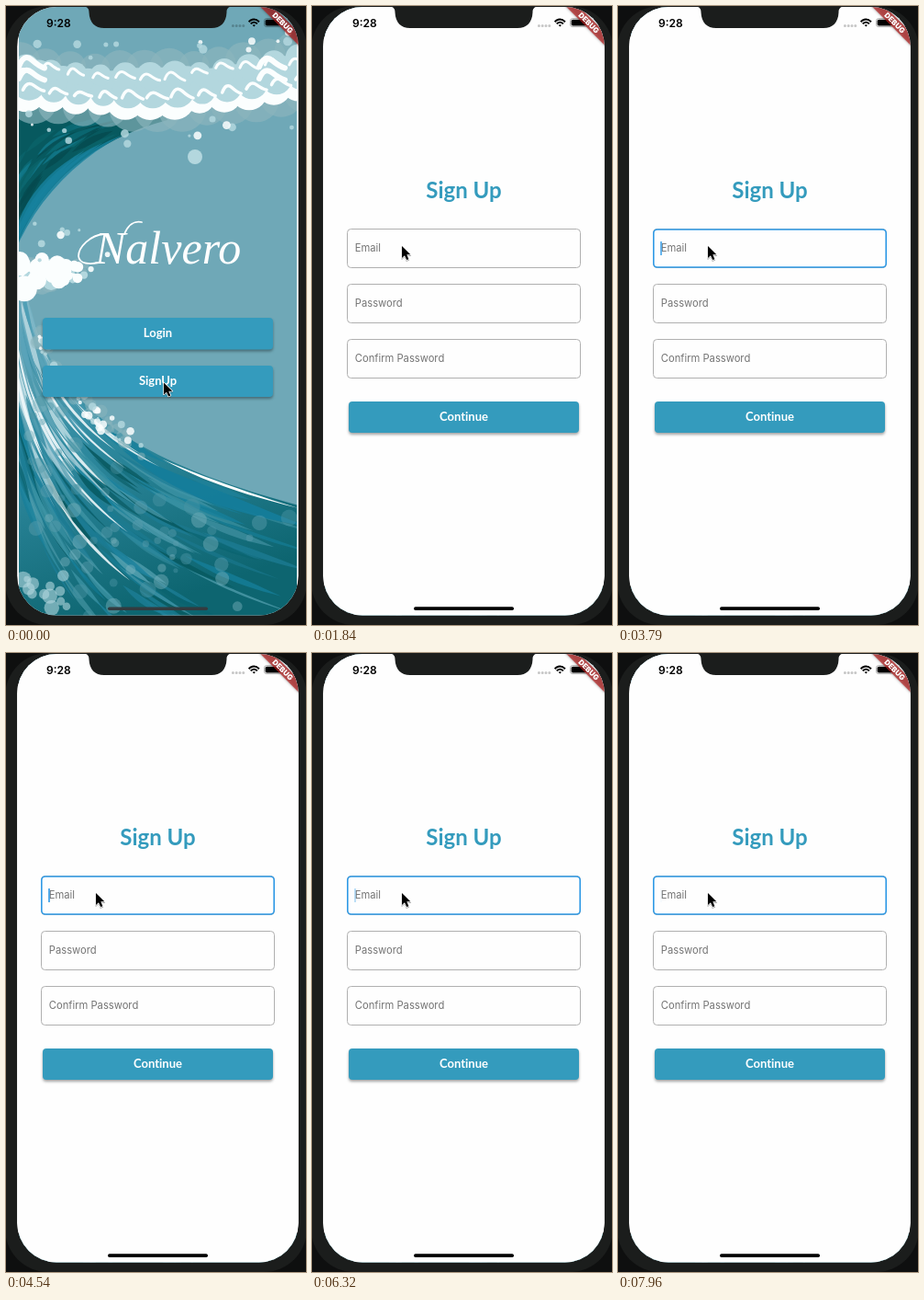
Recreate the animation shown at these times as an HTML page. Size 327 px wide and 673 px high, loop 8000 ms.

```html
<!DOCTYPE html>
<html lang="en">
<head>
<meta charset="utf-8">
<title>Sign up</title>
<style>
  html, body { margin: 0; width: 100%; height: 100%; overflow: hidden; background: #0e0f0f; }
  svg { display: block; width: 327px; height: 673px; }
  .lato { font: 700 13px Lato, sans-serif; fill: #fff; text-anchor: middle; font-variant-ligatures: none; }
  .head { font-size: 24px; fill: #349bbd; }
  .hint { font: 11.2px Inter, sans-serif; fill: #737373; }
  .clock { font: 600 12px Inter, sans-serif; }
  .brand { font: italic 50px "Liberation Serif", serif; fill: #fff; }
  .debug { font: 900 8px Inter, sans-serif; fill: #fff; text-anchor: middle; }
  .btn { fill: #349bbd; filter: drop-shadow(.5px 2px 1.5px rgba(0,0,0,.36)); }
  .box { fill: none; stroke: #b0b0b0; }
  .band { fill: #b71c1c; fill-opacity: .68; }
  #wave { filter: blur(.5px); }
</style>
</head>
<body>
<svg viewBox="0 0 327 673">
  <defs>
    <clipPath id="screen"><rect x="12.2" y="1" width="306.5" height="661.5" rx="43"/></clipPath>
    <clipPath id="art"><rect x="14.5" y="1" width="302" height="661.5"/></clipPath>
    <linearGradient id="sea" x1="0" y1="0" x2=".3" y2="1">
      <stop offset="0" stop-color="#7bb2c2"/>
      <stop offset=".5" stop-color="#2f8aa0"/>
      <stop offset="1" stop-color="#0d6570"/>
    </linearGradient>
  </defs>

  <rect x="-1" width="329" height="673" rx="47" fill="#1b1d1c"/>
  <g clip-path="url(#screen)">
    <rect width="327" height="673" fill="#fefefe"/>

    <g id="home">
      <g clip-path="url(#art)"><g id="wave"></g></g>
      <text class="brand" x="97" y="280">Nalvero</text>
      <path d="M107 248C92 249 79 262 79 272C80 281 92 281 101 279M129 248C133 238 140 233 148 235" fill="none" stroke="#fff" stroke-width="1.8" stroke-linecap="round"/>
      <rect class="btn" x="40" y="339" width="251" height="34.500" rx="4"/>
      <text class="lato" x="165.5" y="360">Login</text>
      <rect class="btn" x="40" y="391" width="251" height="34" rx="4"/>
      <text class="lato" x="165.5" y="412">SignUp</text>
      <rect x="111" y="653.5" width="109" height="3.5" rx="1.7" fill="#343b3f"/>
    </g>

    <g id="form" opacity="0">
      <rect width="327" height="673" fill="#fefefe"/>
      <text class="lato head" x="165.5" y="208.5">Sign Up</text>
      <g id="fields"></g>
      <rect id="focus" x="38.8" y="243" width="253.4" height="41" rx="4" fill="none" stroke="#2f9ae6" stroke-width="1.6"/>
      <rect id="caret" x="46.2" y="256" width="1.6" height="15" fill="#2f9ae6"/>
      <rect class="btn" x="40" y="430" width="251" height="34" rx="4"/>
      <text class="lato" x="165.5" y="451">Continue</text>
      <rect x="111" y="653.3" width="109" height="3.7" rx="1.8"/>
    </g>

    <text class="clock" x="44" y="22.7">9:28</text>
    <path d="M247.400 21.500H259" stroke="#000" stroke-opacity=".22" stroke-width="3" stroke-linecap="round" stroke-dasharray="0 3.8"/>
    <g fill="none" stroke="#000" stroke-width="1.9">
      <path d="M264.6 17.2Q270.3 11.6 276 17.2M266.7 19.4Q270.3 15.8 273.9 19.4"/>
      <path d="M270.3 22.6L268.6 20.8Q270.3 19.5 272 20.8Z" fill="#000" stroke="none"/>
    </g>
    <rect x="281.5" y="13.6" width="18.6" height="9" rx="2.6" fill="none" stroke="#000" stroke-opacity=".4" stroke-width=".8"/>
    <rect x="282.6" y="14.7" width="16.4" height="6.8" rx="1.7"/>
    <g transform="translate(301.7 18.3) rotate(45)">
      <rect x="-40" y="-5" width="80" height="10" style="filter:blur(1.8px)" fill-opacity=".4"/>
      <rect class="band" x="-40" y="-5" width="80" height="10"/>
      <text class="debug" y="2.9">DEBUG</text>
    </g>
  </g>
  <path d="M84 0C89 1 90.500 3 90.500 7C91 18 97 24 107 24H224C234 24 240 18 240.500 7C240.500 3 242 1 247 0Z" fill="#1b1d1c"/>

  <g id="pointer">
    <path transform="scale(.9)" d="M0 0V14.400L3.300 11.300L5.700 16.800L8.200 15.700L5.900 10.400H10.400Z" stroke="#fff" stroke-width="1.6" stroke-linejoin="round" paint-order="stroke" style="filter:drop-shadow(0 1px .8px rgba(0,0,0,.35))"/>
  </g>
</svg>

<script>
const $ = id => document.getElementById(id);

function add(parent, tag, attrs, text = '') {
  const el = document.createElementNS('http://www.w3.org/2000/svg', tag);
  for (const k in attrs) el.setAttribute(k, attrs[k]);
  el.textContent = text;
  return parent.appendChild(el);
}

// ---- Form fields
['Email', 'Password', 'Confirm Password'].forEach((label, i) => {
  const y = 242.5 + 60 * i;
  add($('fields'), 'rect', { class: 'box', x: 38.5, y, width: 254, height: 42, rx: 4 });
  add($('fields'), 'text', { class: 'hint', x: 46.8, y: y + 24.5 }, label);
});

// ---- Wave painting
const wave = $('wave');
const WHITE = '#fbfefe', PALE = '#b3d7de', HAZE = '#8cb5be';
let seed = 28;
const rnd = (a = 0, b = 1) => {
  seed = (seed * 16807) % 2147483647;
  return a + (b - a) * seed / 2147483647;
};
const pick = list => list[Math.floor(rnd(0, list.length))];
const mix = (a, b, s) => a + (b - a) * s;

const dot = (cx, cy, r, fill, opacity = 1) => add(wave, 'circle', { cx, cy, r, fill, opacity });
const shape = (d, fill) => add(wave, 'path', { d, fill });
const repeat = (n, draw) => { for (let i = 0; i < n; i++) draw(i); };

// A short curl of white foam.
function curl(x, y, r, width) {
  const h = r * rnd(.6, 1.1);
  add(wave, 'path', {
    d: `M${x - r} ${y}q${r * .4} ${-h} ${r} ${-h * .5}t${r} ${h * .6}`,
    fill: 'none', stroke: WHITE, 'stroke-width': width, 'stroke-linecap': 'round' });
}

// A point between two cubic guides: s across, t along.
function between(a, b, s, t) {
  const u = 1 - t, w = [u * u * u, 3 * u * u * t, 3 * u * t * t, t * t * t];
  return [0, 1].map(k => w.reduce((sum, v, i) => sum + v * mix(a[i][k], b[i][k], s), 0));
}

// A brush stroke that tapers at both ends.
function streak([a, b], s, t0, t1, fill, width, opacity = 1) {
  const left = [], right = [];
  repeat(13, i => {
    const t = mix(t0, t1, i / 12);
    const [x, y] = between(a, b, s, t), [nx, ny] = between(a, b, s, t + .01);
    const w = width / 2 * Math.sin(Math.PI * i / 12) / (Math.hypot(nx - x, ny - y) || 1);
    const dx = (ny - y) * w, dy = (nx - x) * w;
    left.push(`${x + dx} ${y - dy}`);
    right.unshift(`${x - dx} ${y + dy}`);
  });
  add(wave, 'path', { d: 'M' + left.concat(right).join('L') + 'Z', fill, opacity });
}

add(wave, 'rect', { width: 327, height: 673, fill: '#6fa8b7' });

// Curling lip
const lip = [[[8, 165], [28, 126], [70, 112], [145, 116]], [[10, 266], [34, 198], [92, 146], [176, 124]]];
shape('M10 105H165L176 124C92 146 34 198 10 266Z', '#07595f');
repeat(26, () => {
  const t = rnd(-.05, .65);
  streak(lip, rnd(.05, .9), t, t + rnd(.2, .4), pick(['#0c6c77', '#127a8d', '#054a4f', '#0a636a']), rnd(3, 8), .8);
});
repeat(3, i => streak(lip, .97 - i * .06, -.1, .8 - i * .1, '#17829f', 8, .8));

// Crest foam: haze, white lobes, pale bodies, curls
const crestY = x => 103 - ((x - 140) / 40) ** 2;
const lobes = Array.from({ length: 12 }, (_, i) => ({ x: 22 + 27 * i, r: rnd(16, 22) }));
lobes.forEach(({ x, r }) => dot(x + 8, crestY(x) + 8, r + 5, HAZE, .65));
lobes.forEach(({ x, r }) => dot(x - 6, crestY(x) - 34, r, HAZE, .65));
lobes.forEach(({ x, r }) => dot(x, crestY(x), r, WHITE));
lobes.forEach(({ x, r }) => {
  dot(x + 3, crestY(x) - r * .45, r * .85, PALE);
  dot(x + 13, crestY(x) - 18, r * .85, PALE);
  dot(x, crestY(x) - 27, r * .7, PALE);
});
lobes.forEach(({ x, r }) => {
  curl(x + 8, crestY(x) - 3, r * .55, 3.5);
  curl(x, crestY(x) - rnd(18, 30), r * .5, 3);
});
repeat(4, i => curl(28 + i % 2 * 262, 66 + 13 * (i >> 1), 14, 6));
repeat(26, i => {
  const x = rnd(20, 315);
  dot(x, crestY(x) + (i % 2 ? rnd(22, 48) : rnd(-62, -44)), rnd(1.5, 5), pick([WHITE, PALE, PALE]), .85);
});
dot(206, 164, 8, PALE);

// Rising water
const water = [[[20, 295], [40, 440], [150, 498], [330, 546]], [[4, 400], [18, 555], [95, 655], [240, 725]]];
shape('M20 295C40 440 150 498 330 546V673H8V295Z', 'url(#sea)');
const cool = ['#16809c', '#1c7c94', '#0a6470', '#3d93a4', '#07585f', '#1f839d', '#53a0b0'];
const warm = ['#a8cfda', '#76b2c3', '#d5eaef', '#4a9db4', '#5aa4ba', '#2f88a0'];
repeat(170, () => {
  const s = rnd(.02, 1.25), t = rnd(-.03, .85);
  streak(water, s, t, t + rnd(.12, .32), pick(t < .3 && s < .9 ? warm : cool), rnd(2, 8), rnd(.5, .9));
});
streak(water, .1, .55, 1.02, '#147e9c', 15, .9);
streak(water, .015, .66, .98, WHITE, 3);
repeat(14, () => {
  const t = rnd(0, .4);
  streak(water, rnd(.05, .85), t, t + rnd(.2, .32), '#eef7f9', rnd(2, 3.5), .9);
});
repeat(85, () => {
  const [x, y] = between(...water, rnd(.08, 1.25), rnd(.2, 1));
  dot(x, y, rnd(2.5, 9), pick(['#5c9eac', '#79b1bc', '#4b95a4']), .45);
});
repeat(14, () => dot(rnd(18, 70), rnd(618, 655), rnd(3, 9), PALE, .6));

// Spray along the inner edge
repeat(70, i => {
  const [x, y] = between(...water, rnd(-.06, .09), rnd(.15, .62));
  dot(x, y, i < 30 ? rnd(4, 8) : rnd(1.2, 4.5), i < 30 ? HAZE : pick([WHITE, PALE]), i < 30 ? .5 : .85);
});

// Foam mound at the left, thinning out to the right
repeat(60, i => {
  const layer = Math.floor(i / 20), x = rnd(14, 92 - 6 * layer), thin = 1 - (x - 14) / 110;
  dot(x, 294 + rnd(-22, 18) * thin - (x - 14) * .08, rnd(9, 15) * thin, [HAZE, PALE, WHITE][layer], layer ? 1 : .7);
});
repeat(3, i => curl(30 + 16 * i, 292 + 7 * (i % 2), 12, 4));
repeat(9, () => dot(rnd(30, 122), rnd(232, 292), rnd(1.5, 4.5), pick([WHITE, PALE]), .9));

// ---- Timeline, in ms
const LOOP = 8000, STEP = 149, FIRST = 53;
const SUBMIT = 740, MOVE = 1300, CLICK = 2080, BLINK = 2770, HALF = 498, FADE = 250;
const clamp = v => Math.min(1, Math.max(0, v));
const easeOut = v => 1 - (1 - v) ** 2;
const easeInOut = v => v * v * (3 - 2 * v);

function caretAlpha(t) {
  if (t < BLINK) return clamp((t - CLICK) / 340);
  const fade = easeOut(clamp((t - BLINK) % HALF / FADE));
  return Math.floor((t - BLINK) / HALF) % 2 ? fade : 1 - fade;
}

function draw(now) {
  const t = now % LOOP;
  const s = FIRST + Math.floor((t - FIRST) / STEP) * STEP; // the recording's coarse frame rate
  const m = easeInOut(clamp((s - MOVE) / 500));
  $('form').setAttribute('opacity', t < SUBMIT ? 0 : 1);
  $('focus').setAttribute('opacity', clamp((s - CLICK) / 200));
  $('caret').setAttribute('opacity', caretAlpha(s));
  $('pointer').setAttribute('transform', `translate(${mix(172, 98, m)} ${mix(409.5, 261, m)})`);
}

function tick() {
  draw(performance.now());
  requestAnimationFrame(tick);
}
tick();
</script>
</body>
</html>
```
